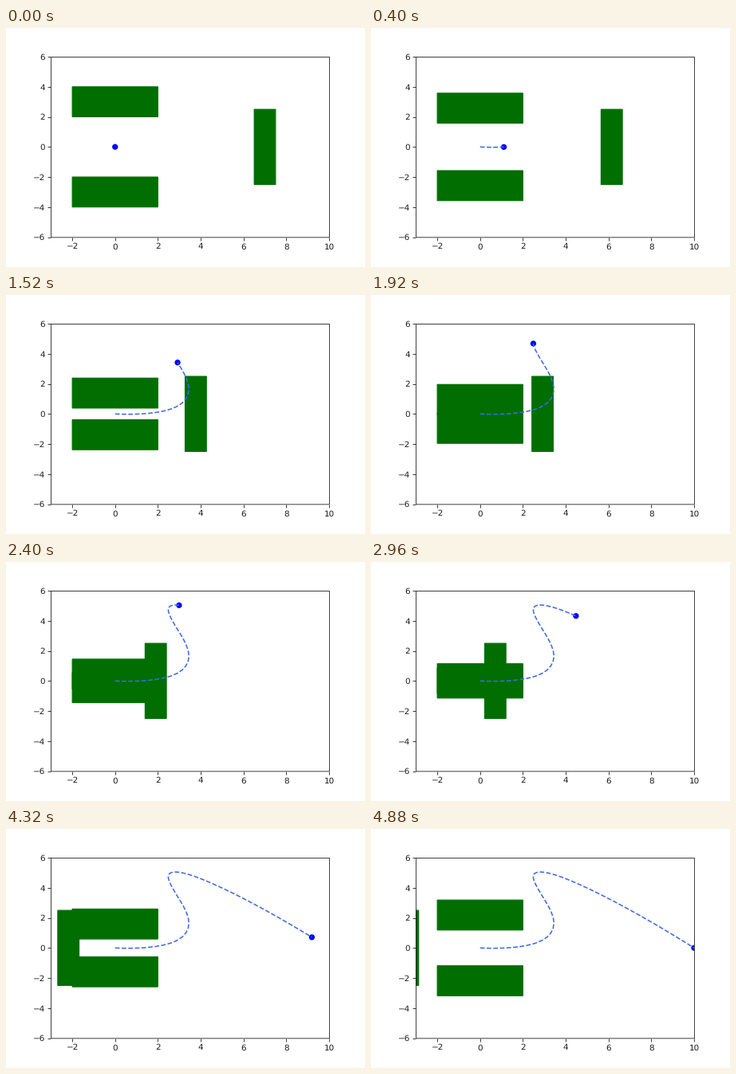
These frames come from a looping animation (450 px wide and 300 px high, 4960 ms). A matplotlib script:

```python
import numpy as np
import matplotlib.pyplot as plt
from matplotlib.animation import FuncAnimation
from matplotlib.patches import Ellipse, Rectangle
from matplotlib.transforms import ScaledTranslation

FRAMES, INTERVAL = 62, 80
WALL_STEP = 0.17     # leftward drift of the tall block per frame
GATE_STEP = 0.085    # vertical drift of the two gate blocks per frame
GREEN = "#006e00"
INK = "0.12"

# Waypoints of the moving dot: frame, x, y
WAYPOINTS = np.array([
    (0, 0, 0), (10, 2.90, 0.50), (14, 3.45, 1.65), (19, 2.92, 3.42),
    (24, 2.485, 4.68), (30, 2.99, 5.03), (37, 4.48, 4.32),
    (47, 7.36, 2.24), (61, 10, 0),
])


def clamped_spline(knots, points, t):
    """Cubic spline through points, at rest at both ends."""
    n = len(knots)
    h = np.diff(knots)
    slope = np.diff(points, axis=0) / h[:, None]
    system, rhs = np.eye(n), np.zeros_like(points)
    for i in range(1, n - 1):
        system[i, i - 1:i + 2] = h[i], 2 * (h[i - 1] + h[i]), h[i - 1]
        rhs[i] = 3 * (h[i] * slope[i - 1] + h[i - 1] * slope[i])
    speed = np.linalg.solve(system, rhs)

    k = np.clip(np.searchsorted(knots, t, side="right") - 1, 0, n - 2)
    width = h[k][:, None]
    s = (t - knots[k])[:, None] / width
    ease = s * s * (3 - 2 * s)
    return (points[k] * (1 - ease) + points[k + 1] * ease
            + width * s * (1 - s) * ((1 - s) * speed[k] - s * speed[k + 1]))


path = clamped_spline(WAYPOINTS[:, 0], WAYPOINTS[:, 1:], np.arange(FRAMES))

plt.rcParams["text.hinting"] = "none"
fig, ax = plt.subplots(figsize=(6, 4), dpi=75)
fig.subplots_adjust(left=0.125, right=0.9, bottom=0.125, top=0.88)
ax.set(xlim=(-3, 10), ylim=(-6, 6),
       xticks=range(-2, 11, 2), yticks=range(-6, 7, 2))
ax.tick_params(width=0.72, labelcolor=INK)

# Fine frame, placed between whole pixels for a soft edge
ax.spines[:].set_visible(False)
nudge = ScaledTranslation(0.005, -0.005, fig.dpi_scale_trans)
ax.add_patch(Rectangle((0, 0), 1, 1, transform=ax.transAxes + nudge,
                       fill=False, lw=0.72, snap=False, clip_on=False,
                       zorder=2.5))


def add_block(x, y, w, h):
    return ax.add_patch(Rectangle((x, y), w, h, color=GREEN, lw=1, snap=False))


upper = add_block(-2, 2, 4, 2)
lower = add_block(-2, -4, 4, 2)
wall = add_block(6.5, -2.5, 1, 5)
dot = ax.add_patch(Ellipse((0, 0), 0.272, 0.386, color="blue", lw=0))
trail, = ax.plot([], [], "--", color="royalblue", lw=1.5)


def update(i):
    upper.set_y(2 - GATE_STEP * i)
    lower.set_y(-4 + GATE_STEP * i)
    wall.set_x(6.5 - WALL_STEP * i)
    dot.set_center(path[i])
    trail.set_data(path[:i + 1].T)
    return upper, lower, wall, dot, trail


anim = FuncAnimation(fig, update, frames=FRAMES, interval=INTERVAL,
                     repeat=True, repeat_delay=0)
plt.show()
```
